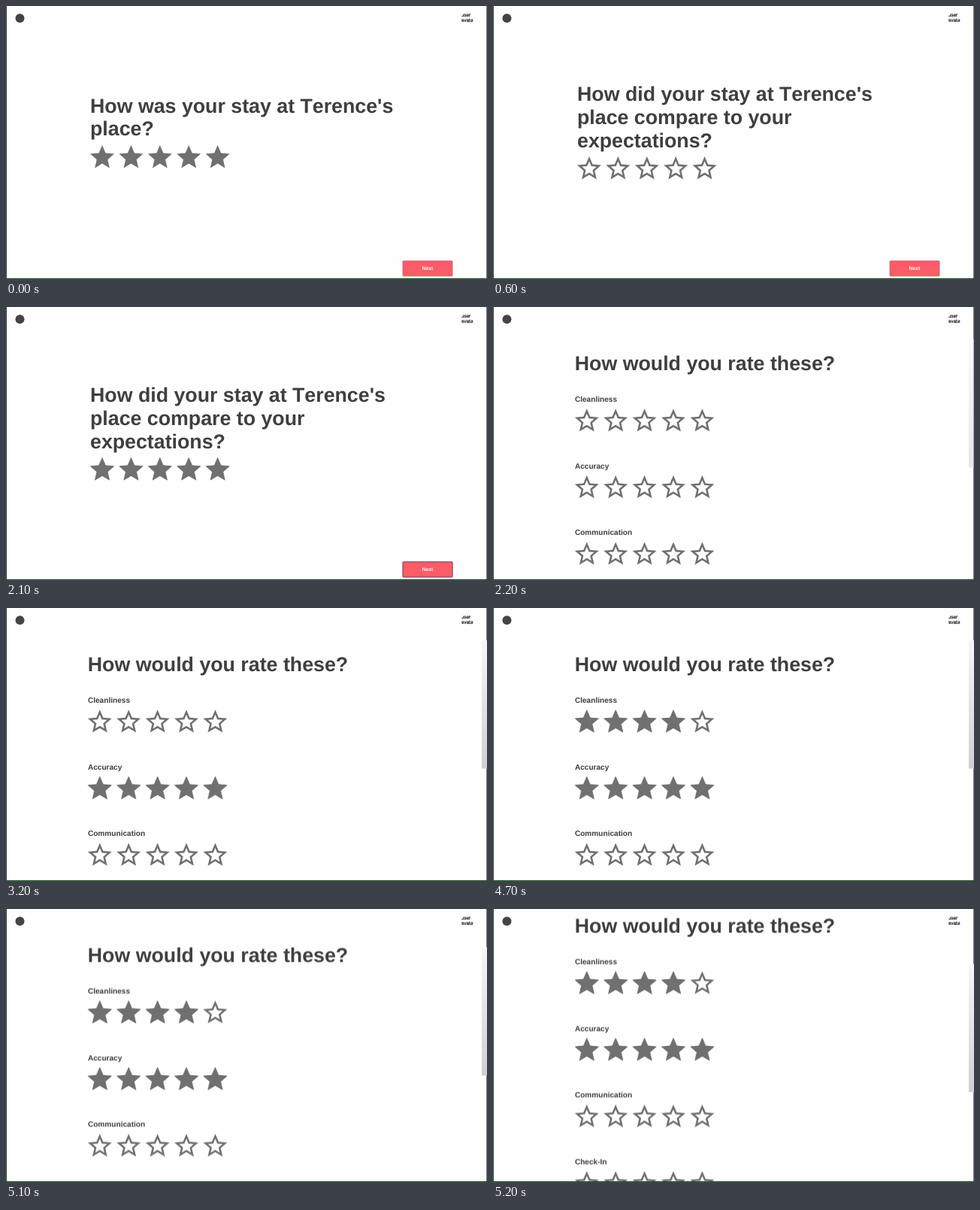
These frames come from a looping animation (640 px wide and 363 px high, 5.4 s). An HTML page:

```html
<!DOCTYPE html>
<html lang="en">
<head>
<meta charset="utf-8">
<title>Stay review</title>
<style>
  html, body { margin: 0; width: 100%; height: 100%; overflow: hidden; background: #fefefe; }
  svg { display: block; width: 100vw; height: 100vh; }
  text { font-family: "Liberation Sans", Arial, sans-serif; font-kerning: none; text-rendering: geometricPrecision; fill: #3f3f41; }
  .title { font-size: 26.75px; font-weight: bold; }
  .label { font-size: 10.1px; font-weight: bold; }
  .next { font-size: 6.7px; font-weight: bold; fill: #fff; text-anchor: middle; }
  .alt { font-size: 6.5px; fill: #111; stroke: #111; stroke-width: .2px; }
  .star { fill: #707071; }

  .anim { animation: 5400ms step-end infinite; }
  .stay { animation-name: stay; }
  .compare { animation-name: compare; }
  .compare-fill { animation-name: compare-fill; }
  .button { animation-name: button; }
  .focus { animation-name: focus; }
  .rate { animation-name: rate; }
  .accuracy-fill { animation-name: accuracy-fill; }
  .clean-fill { animation-name: clean-fill; }
  .scroll { animation-name: scroll; }
  .thumb { animation-name: thumb; }
  .bar { animation-name: bar; }

  @keyframes stay { 0% { opacity: 1 } 11.111%, 100% { opacity: 0 } }
  @keyframes compare { 0% { opacity: 0 } 11.111% { opacity: 1 } 40.74%, 100% { opacity: 0 } }
  @keyframes compare-fill { 0% { opacity: 0 } 27.777%, 100% { opacity: 1 } }
  @keyframes button { 0% { opacity: 1 } 40.74%, 100% { opacity: 0 } }
  @keyframes focus {
    0% { opacity: 0 } 9.259% { opacity: 1 } 11.111% { opacity: 0 }
    38.888% { opacity: 1 } 40.74%, 100% { opacity: 0 }
  }
  @keyframes rate { 0% { opacity: 0 } 40.74%, 100% { opacity: 1 } }
  @keyframes accuracy-fill { 0% { opacity: 0 } 59.259%, 100% { opacity: 1 } }
  @keyframes clean-fill { 0% { opacity: 0 } 87.037%, 100% { opacity: 1 } }
  @keyframes bar { 0% { opacity: .5 } 42.592%, 100% { opacity: 1 } }
  @keyframes scroll {
    0% { transform: translateY(0) } 92.592% { transform: translateY(-2px) }
    94.444% { transform: translateY(-13.5px) } 96.296%, 100% { transform: translateY(-52.5px) }
  }
  @keyframes thumb {
    0% { transform: translateY(0) } 92.592% { transform: translateY(1px) }
    94.444% { transform: translateY(8px) } 96.296%, 100% { transform: translateY(30px) }
  }
</style>
</head>
<body>
<svg viewBox="0 0 640 363" preserveAspectRatio="none">
  <defs>
    <path id="full" transform="scale(1.6)" d="M12 17.27 18.18 21l-1.64-7.03L22 9.24l-7.19-.61L12 2 9.19 8.63 2 9.24l5.46 4.73L5.82 21z"/>
    <path id="hollow" transform="scale(1.6)" d="M22 9.24l-7.19-.62L12 2 9.19 8.63 2 9.24l5.46 4.73L5.82 21 12 17.27 18.18 21l-1.63-7.03zM12 15.4l-3.76 2.27 1-4.28-3.32-2.88 4.38-.38L12 6.1l1.71 4.04 4.38.38-3.32 2.88 1 4.28z"/>
    <g id="full4" class="star">
      <use href="#full"/><use href="#full" x="38.4"/><use href="#full" x="76.8"/><use href="#full" x="115.2"/>
    </g>
    <g id="full5" class="star"><use href="#full4"/><use href="#full" x="153.6"/></g>
    <g id="hollow5" class="star">
      <use href="#hollow"/><use href="#hollow" x="38.4"/><use href="#hollow" x="76.8"/><use href="#hollow" x="115.2"/><use href="#hollow" x="153.6"/>
    </g>
    <clipPath id="round"><circle cx="613.8" cy="16.5" r="8.2"/></clipPath>
    <linearGradient id="shade" x2="0" y2="1">
      <stop offset="0" stop-color="#f6f6f6"/>
      <stop offset="1" stop-color="#d0d0d0"/>
    </linearGradient>
  </defs>

  <rect width="640" height="363" fill="#fefefe"/>
  <rect width="1" height="363" fill="#3c3c3c"/>
  <rect x="639" width="1" height="363" fill="#777"/>

  <g class="anim stay">
    <text class="title" x="112" y="141.5">How was your stay at Terence's</text>
    <text class="title" x="112" y="172.4">place?</text>
    <use href="#full5" x="108.8" y="181.8"/>
  </g>

  <g class="anim compare">
    <text class="title" x="112" y="126">How did your stay at Terence's</text>
    <text class="title" x="112" y="156.9">place compare to your</text>
    <text class="title" x="112" y="187.8">expectations?</text>
    <use href="#hollow5" x="108.8" y="196.8"/>
    <use class="anim compare-fill" href="#full5" x="108.8" y="196.8"/>
  </g>

  <g class="anim button">
    <rect x="528" y="338.9" width="66" height="20.2" rx=".8" fill="#fc5c68" stroke="#c9586c" stroke-width=".8"/>
    <rect class="anim focus" x="528" y="338.9" width="66" height="20.2" rx=".8" fill="none" stroke="#7c4568" stroke-width=".9"/>
    <text class="next" x="561" y="351.3">Next</text>
  </g>

  <g class="anim rate">
    <g class="anim scroll">
      <text class="title" x="108.8" y="84">How would you rate these?</text>
      <text class="label" x="108.9" y="126">Cleanliness</text>
      <text class="label" x="108.9" y="214.6">Accuracy</text>
      <text class="label" x="108.9" y="303.2">Communication</text>
      <text class="label" x="108.9" y="391.8">Check-In</text>
      <use href="#hollow5" x="105.6" y="132"/>
      <use href="#hollow5" x="105.6" y="220.6"/>
      <use href="#hollow5" x="105.6" y="309.2"/>
      <use href="#hollow5" x="105.6" y="397.8"/>
      <use class="anim clean-fill" href="#full4" x="105.6" y="132"/>
      <use class="anim accuracy-fill" href="#full5" x="105.6" y="220.6"/>
    </g>
    <g class="anim bar">
      <rect class="anim thumb" x="633" y="43" width="7" height="170.5" fill="url(#shade)"/>
    </g>
  </g>

  <circle cx="18.5" cy="16.3" r="6" fill="#444"/>
  <g clip-path="url(#round)">
    <text class="alt" x="605.6" y="14">user</text>
    <text class="alt" x="605.6" y="21.3">avatar</text>
  </g>
  <rect y="362" width="640" height="1" fill="#14501a"/>
</svg>
</body>
</html>
```
